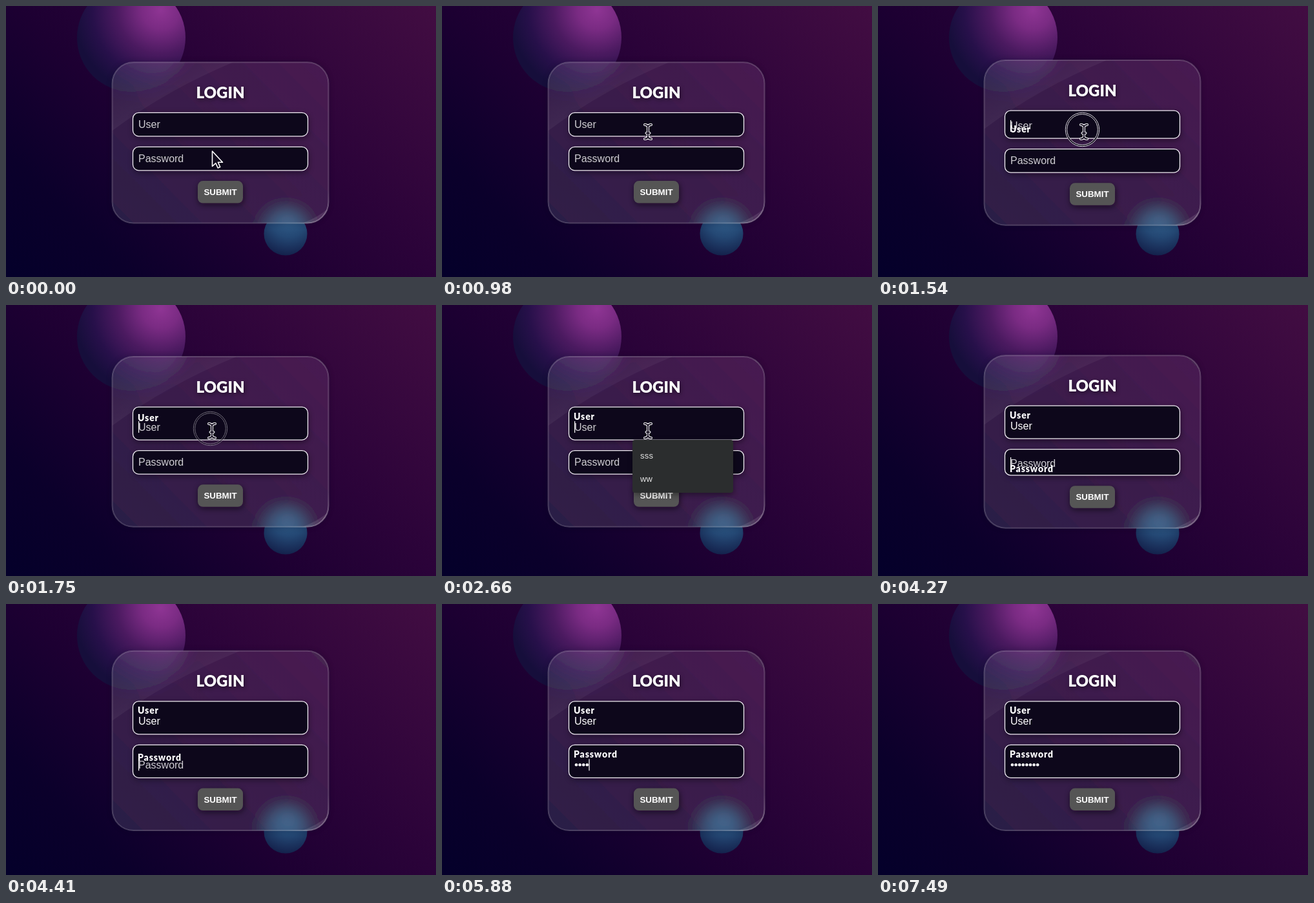
An HTML page for the animation above (7.63 s loop, 666 by 420 pixels).

```html
<!DOCTYPE html>
<html lang="en">
<head>
<meta charset="utf-8">
<title>Login form</title>
<style>
  html, body { margin: 0; width: 100%; height: 100%; overflow: hidden; background: #1d0133; }
  svg { display: block; width: 100vw; height: 100vh; }
  text { fill: #fff; font-family: "Liberation Sans", Arial, sans-serif; }
  .title, .label { font-family: Lato, sans-serif; font-weight: 900; }
  .title { font-size: 24px; text-anchor: middle; filter: drop-shadow(1px 2px 3px #0008); }
  .label { font-size: 14px; letter-spacing: .85px; }
  .value { font-size: 16px; }
  .submit { font-size: 13.333px; font-weight: 700; text-anchor: middle; }
  .item { font-size: 13px; letter-spacing: .2px; fill: #e6e6e6; }
  .box { fill: #0d071b; stroke: #f1eef4; stroke-width: 1.3; }
</style>
</head>
<body>
<svg viewBox="0 0 666 420">
  <defs>
    <linearGradient id="night" gradientUnits="userSpaceOnUse" x1="61.5" y1="481.5" x2="604.5" y2="-61.5">
      <stop offset="0" stop-color="#04002a"/>
      <stop offset=".18" stop-color="#0b002b"/>
      <stop offset=".4" stop-color="#1d0032"/>
      <stop offset=".62" stop-color="#2b0339"/>
      <stop offset="1" stop-color="#420d42"/>
    </linearGradient>
    <radialGradient id="pink" gradientUnits="userSpaceOnUse" cx="240" cy="6" r="136">
      <stop offset="0" stop-color="#8f3594"/>
      <stop offset=".22" stop-color="#7a2b83"/>
      <stop offset=".5" stop-color="#4b1a60"/>
      <stop offset=".78" stop-color="#27104a"/>
      <stop offset="1" stop-color="#160e3b"/>
    </radialGradient>
    <radialGradient id="blue" gradientUnits="userSpaceOnUse" cx="438" cy="328" r="60">
      <stop offset="0" stop-color="#33608c"/>
      <stop offset=".5" stop-color="#244874"/>
      <stop offset="1" stop-color="#13204a"/>
    </radialGradient>
    <linearGradient id="glass" x1="0" y1="1" x2="1" y2="0">
      <stop offset="0" stop-color="#fff" stop-opacity=".12"/>
      <stop offset="1" stop-color="#fff" stop-opacity=".1"/>
    </linearGradient>
    <linearGradient id="shine" gradientUnits="userSpaceOnUse" x1="40" y1="0" x2="92" y2="92">
      <stop offset="0" stop-color="#fff" stop-opacity="0"/>
      <stop offset=".6" stop-color="#fff" stop-opacity=".04"/>
      <stop offset="1" stop-color="#fff" stop-opacity=".09"/>
    </linearGradient>
    <linearGradient id="rim" x1="0" y1="0" x2="1" y2="1">
      <stop offset="0" stop-color="#fff" stop-opacity=".2"/>
      <stop offset=".9" stop-color="#fff" stop-opacity=".2"/>
      <stop offset="1" stop-color="#fff" stop-opacity=".4"/>
    </linearGradient>
    <filter id="blur" filterUnits="userSpaceOnUse" x="-60" y="-60" width="786" height="540"><feGaussianBlur stdDeviation="13"/></filter>
    <filter id="soft" x="-30%" y="-60%" width="160%" height="220%"><feGaussianBlur stdDeviation="5"/></filter>
    <clipPath id="cardClip"><rect class="card" x="164.5" width="335" rx="33"/></clipPath>
    <g id="scene">
      <rect x="-60" y="-60" width="786" height="540" fill="url(#night)"/>
      <circle cx="194" cy="49" r="84" fill="url(#pink)"/>
      <circle cx="433" cy="353" r="33.5" fill="url(#blue)"/>
    </g>
  </defs>

  <use href="#scene"/>
  <rect class="card" x="164.5" width="335" rx="33" fill="#10001c" opacity=".3" filter="url(#soft)"/>
  <g clip-path="url(#cardClip)">
    <use href="#scene" filter="url(#blur)"/>
    <rect class="card" x="164.5" width="335" rx="33" fill="url(#glass)"/>
    <path id="streak" d="M0 0H187Q82 44 0 106Z" fill="url(#shine)"/>
    <path id="corner" d="M0 -23Q-16 -9 -40 0H0Z" fill="#fff" opacity=".1"/>
  </g>
  <rect class="card" x="164.5" width="335" rx="33" fill="none" stroke="url(#rim)" stroke-width="2"/>
  <text id="title" class="title" x="332">LOGIN</text>
  <g id="fields"></g>
  <g id="button">
    <rect x="298" y="3" width="70" height="34" rx="8" fill="#08000f" opacity=".6" filter="url(#soft)"/>
    <rect x="297" width="70" height="34.5" rx="8" fill="#555"/>
    <text class="submit" x="332" y="22">SUBMIT</text>
  </g>
  <g id="popup">
    <rect x="297" y="212" width="154" height="82" rx="4" opacity=".4" filter="url(#soft)"/>
    <rect x="295" y="209" width="156" height="82" rx="4" fill="#2b2d2e"/>
    <text class="item" x="307" y="238">sss</text>
    <text class="item" x="307" y="274">ww</text>
  </g>
  <g id="ripple" fill="none">
    <circle r="25" stroke="#0a0614" stroke-width="3"/>
    <circle r="26.2" stroke="#dcd8e2" stroke-width="1"/>
    <circle r="23.8" stroke="#dcd8e2" stroke-width="1"/>
  </g>
  <path id="arrow" d="M0 0V23.5L5.3 18.6L8.7 26L12.2 24.5L8.9 17.2H16Z" fill="#120c1e" stroke="#fff" stroke-width="1.6" stroke-linejoin="round"/>
  <g id="beam" fill="none" stroke-linecap="round">
    <path id="beamShape" d="M-5 -11Q-1 -11 0 -8Q1 -11 5 -11M0 -8V8M-5 11Q-1 11 0 8Q1 11 5 11M-2.5 2H2.5" stroke="#fff" stroke-width="4"/>
    <use href="#beamInner"/>
    <path id="beamInner" d="M-5 -11Q-1 -11 0 -8Q1 -11 5 -11M0 -8V8M-5 11Q-1 11 0 8Q1 11 5 11M-2.5 2H2.5" stroke="#120c1e" stroke-width="1.6"/>
  </g>
</svg>
<script>
const LOOP = 7630, GROW = 14.5, PITCH = 5.6;
const $ = id => document.getElementById(id);
const set = (el, attrs) => { for (const k in attrs) el.setAttribute(k, attrs[k]); };
const clamp = x => Math.max(0, Math.min(1, x));
const span = (t, from, to) => clamp((t - from) / (to - from));
const mix = (a, b, k) => a + (b - a) * k;

function bezier(x1, y1, x2, y2) {
  const at = (a, b, s) => 3 * a * s * (1 - s) ** 2 + 3 * b * s * s * (1 - s) + s ** 3;
  return x => {
    if (x <= 0 || x >= 1) return clamp(x);
    let lo = 0, hi = 1;
    for (let i = 0; i < 24; i++) {
      const mid = (lo + hi) / 2;
      if (at(x1, x2, mid) < x) lo = mid; else hi = mid;
    }
    return at(y1, y2, lo);
  };
}
const ease = bezier(.25, .1, .25, 1);
const easeInOut = bezier(.42, 0, .58, 1);

const fields = [
  { name: 'User', focus: 1440, blur: 4195, keys: [2730, 2870, 3150, 3430] },
  { name: 'Password', focus: 4195, blur: LOOP, secret: true,
    keys: [5250, 5460, 5670, 5880, 6020, 6230, 6440, 6720] }
];

for (const f of fields) {
  const g = f.group = document.createElementNS('http://www.w3.org/2000/svg', 'g');
  g.innerHTML = `
    <rect class="back" x="198" y="3" width="270" rx="9" fill="#08000f" opacity=".5" filter="url(#soft)"/>
    <rect class="box" x="196.5" y=".5" width="271" rx="9"/>
    <text class="value" x="205"></text>
    <g class="dots" fill="#fff">${f.keys.map((_, i) => `<circle cx="${208 + i * PITCH}" r="2.3"/>`).join('')}</g>
    <text class="label" x="204">${f.name}</text>
    <rect class="caret" width="1.2" height="18" fill="#fff"/>`;
  $('fields').append(g);
  for (const part of ['back', 'box', 'value', 'dots', 'label', 'caret']) f[part] = g.querySelector('.' + part);
}

// Caret stays solid after focus or a key press, then blinks every half second.
function caretOn(f, t) {
  if (t < f.focus || t >= f.blur) return false;
  const last = Math.max(f.focus, ...f.keys.filter(k => k <= t));
  return Math.floor((t - last) / 500) % 2 === 0;
}

function drawField(f, t, top, open) {
  const height = 37 + GROW * open, middle = 18.5 + 13 * open;
  const count = f.keys.filter(k => k <= t).length;
  set(f.group, { transform: `translate(0 ${top})` });
  set(f.back, { height });
  set(f.box, { height: height - .5 });
  f.value.textContent = !count ? f.name : f.secret ? '' : f.name.slice(0, count);
  set(f.value, { y: middle + 5.5, opacity: count ? 1 : .8 });
  set(f.dots, { transform: `translate(0 ${middle})` });
  [...f.dots.children].forEach((dot, i) => set(dot, { opacity: f.secret && i < count ? 1 : 0 }));
  set(f.label, {
    y: 20 + 20 * (1 - ease(span(t, f.focus, f.focus + 500))),
    opacity: span(t, f.focus, f.focus + 70)
  });
  const typed = !count ? 0 : f.secret ? count * PITCH : f.value.getComputedTextLength();
  set(f.caret, { x: 205 + typed, y: middle - 9, opacity: caretOn(f, t) ? 1 : 0 });
  return top + height + 16;
}

function drawPointer(t) {
  const y = mix(mix(225, 190, easeInOut(span(t, 60, 300))), 195, span(t, 490, 700));
  const isBeam = t >= 140, visible = t < 2730;
  set($('arrow'), { transform: `translate(319.5 ${y})`, opacity: visible && !isBeam ? 1 : 0 });
  set($('beam'), { transform: `translate(319 ${y})`, opacity: visible && isBeam ? 1 : 0 });
  const scale = mix(.4, 1, ease(span(t, 1190, 1450)));
  set($('ripple'), {
    transform: `translate(316.5 191.5) scale(${scale})`,
    opacity: t < 1190 ? 0 : 1 - span(t, 1600, 1890)
  });
}

function render(t) {
  const open = fields.map(f => easeInOut(span(t, f.focus, f.focus + 215)));
  const extra = GROW * (open[0] + open[1]);
  const top = 87.3 - extra / 2, height = 249.2 + extra;
  document.querySelectorAll('.card').forEach(el => set(el, { y: top, height }));
  set($('streak'), { transform: `translate(164.5 ${top}) scale(${1 + extra / 500} ${1 + extra / 1500})` });
  set($('corner'), { transform: `translate(499.5 ${top + height})` });
  set($('title'), { y: top + 55.5 });
  let y = top + 77.5;
  fields.forEach((f, i) => { y = drawField(f, t, y, open[i]); });
  set($('button'), { transform: `translate(0 ${y + .3})` });
  set($('popup'), { opacity: t < 2730 ? span(t, 1930, 2140) : 0 });
  drawPointer(t);
}

const start = performance.now();
function tick() {
  render((performance.now() - start) % LOOP);
  requestAnimationFrame(tick);
}
tick();
</script>
</body>
</html>
```
